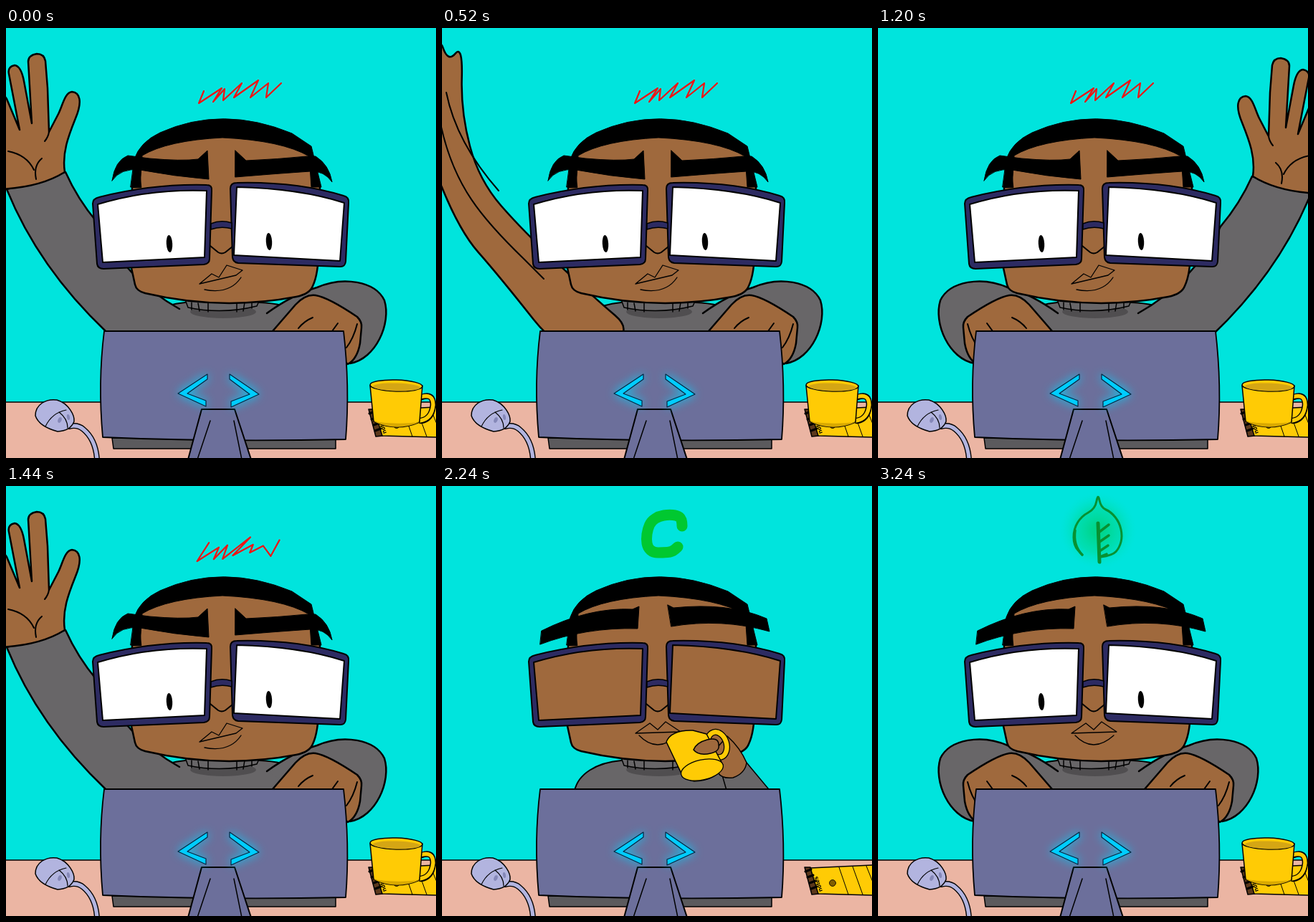
Write an HTML page with a canvas that moves like this. It is 600 px wide and 600 px high and loops after 3280 ms.

```html
<!DOCTYPE html>
<html lang="en">
<head>
<meta charset="utf-8">
<title>Desk worker</title>
<style>
html, body { margin: 0; width: 100%; height: 100%; overflow: hidden; background: #00e4dd; }
canvas { display: block; width: 600px; height: 600px; }
</style>
</head>
<body>
<canvas id="stage" width="600" height="600"></canvas>
<script>
const c = document.getElementById('stage').getContext('2d');
const LOOP = 3280, STEP = 40;
const SKIN = '#9f693d', GREY = '#686668', YELLOW = '#ffcb05', NAVY = '#2d2b62', LILAC = '#b2b4df';
const clamp = x => Math.max(0, Math.min(1, x));
const ramp = (t, a, b) => clamp((t - a) / (b - a));
const ease = x => x * x * (3 - 2 * x);
const mix = (a, b, k) => a + (b - a) * k;
const mixPoints = (a, b, k) => a.map((p, i) => [mix(p[0], b[i][0], k), mix(p[1], b[i][1], k)]);
const mixColor = (a, b, k) => `rgb(${a.map((v, i) => Math.round(mix(v, b[i], k)))})`;
const middle = (a, b) => [(a[0] + b[0]) / 2, (a[1] + b[1]) / 2];

function shape(d, fill, width = 2, stroke = '#000') {
  const p = new Path2D(d);
  if (fill) { c.fillStyle = fill; c.fill(p); }
  if (width) { c.lineWidth = width; c.strokeStyle = stroke; c.stroke(p); }
}
function oval(x, y, rx, ry, turn, fill, width = 0) {
  c.beginPath();
  c.ellipse(x, y, rx, ry, turn, 0, 7);
  c.fillStyle = fill;
  c.fill();
  if (width) { c.lineWidth = width; c.strokeStyle = '#000'; c.stroke(); }
}
function at(x, y, draw, flip = 1) {
  c.save();
  c.translate(x, y);
  c.scale(flip, 1);
  draw();
  c.restore();
}
// Soft curves running through the midpoints, closed and open
function softLoop(pts) {
  const mid = i => middle(pts[i % pts.length], pts[(i + 1) % pts.length]);
  return `M${mid(0)}` + pts.map((p, i) => `Q${pts[(i + 1) % pts.length]} ${mid(i + 1)}`).join('');
}
function softLine(pts) {
  const inner = pts.slice(1, -1).map((p, i) => `Q${p} ${middle(p, pts[i + 2])}`);
  return `M${pts[0]}${inner.join('')}L${pts[pts.length - 1]}`;
}

// Arms are drawn for the right side of the stage and mirrored for the left
const SWING = [[350,426],[402,380],[480,306],[530,252],[554,182],[557,114],[578,136],[590,108],[612,205],[568,325],[520,378],[440,460]];
const TYPE = [[372,423],[395,395],[415,374],[430,370],[450,376],[470,386],[492,400],[498,412],[496,435],[490,462],[477,471],[440,440]];

function sleeve() {
  shape('M364 398 Q400 372 434 362 C470 346 515 353 528 380 C538 412 516 462 480 468', GREY, 2.5);
}
function restArm() {
  sleeve();
  shape('M372 423 L404 386 Q418 371 432 373 Q450 376 490 403 Q497 410 496 418 L494 440 Q490 462 477 469 L440 440', SKIN, 2.5);
  shape('M428 404 Q416 409 408 419 M463 412 L455 423 M490 413 Q485 433 475 446', null);
}
function raisedArm() {
  shape('M363 398 Q440 355 478 277 Q505 245 522 207 L604 231 Q560 340 465 430 L363 445', GREY, 2.5);
  shape('M523 207 C527 180 518 157 508 132 C498 108 502 96 513 95 C523 96 526 114 532 126 L545 151 L547 90 L550 52 Q552 42 562 42 Q574 44 574 53 L569 139 L580 80 Q584 59 593 58 Q603 60 601 70 L586 148 L604 105 Q612 92 618 105 L620 231 Q560 230 523 207Z', SKIN, 2.5);
  shape('M545 151 Q546 158 551 164 M555 188 Q567 198 563 217 M602 178 Q576 183 566 204', null);
}
function swingingArm(k) {
  if (k > .55) sleeve();
  shape(softLoop(mixPoints(SWING, TYPE, k)), SKIN, 2.5);
  if (k < .5) {
    c.globalAlpha = 1 - 2 * Math.max(0, k);
    at(-90 * k, 180 * k, () =>
      shape('M579 150 Q565 220 506 287 M586 198 C568 280 530 325 471 382 L443 410', null));
    c.globalAlpha = 1;
  }
}
// Phase runs 0..480, fully raised at 0
function arm(phase, left) {
  const k = phase < 240 ? (phase - 80) / 120 : (440 - phase) / 80;
  const up = phase < 40, flip = left ? -1 : 1;
  const draw = up ? raisedArm : k >= 1 ? restArm : () => swingingArm(k);
  at(left ? (up ? 605 : 615) : 0, left && up ? -6 : 0, draw, flip);
}

function torso() {
  shape('M185 425 C190 402 215 386 250 383 H354 C400 385 430 402 435 425', GREY, 2);
}
function collar() {
  oval(303, 396, 46, 9, 0, '#504e50');
  shape('M250 379 L254 390 Q302 400 350 388 L354 379', GREY, 1.5);
  shape('M259 383 V393 M268 384 L270 395 M282 384 V396 M322 384 V396 M333 383 L331 395 M343 382 V391', null, 1.5);
}

function head(angry, asleep) {
  shape('M184 178 L188 222 H176 L175 335 L180 358 Q182 367 194 370 Q300 395 405 375 Q424 371 428 360 Q436 343 436 310 L438 222 L424 178 Q305 115 184 178Z', SKIN, 2.5);
  shape('M179 183 Q187 159 215 146 Q302 107 399 147 L426 165 L440 222 H426 L423 179 Q385 157 302 153 Q225 157 190 178 L187 222 H174Z', '#000', 1);
  if (angry) {
    shape('M148 213 Q152 185 170 178 L200 182 Q245 186 268 183 L281 171 L283 211 Q235 207 187 198 Q160 195 148 213Z M320 171 L335 185 Q380 183 420 179 L432 179 Q451 191 455 215 Q444 199 425 200 Q380 203 320 208Z', '#000', 1);
  } else {
    shape('M139 202 Q205 169 266 172 L275 168 L273 199 Q200 197 137 221Z M315 166 L323 170 Q400 162 453 185 L457 203 Q390 184 320 196Z', '#000', 1);
  }
  shape('M285 304 L296 313 Q301 316 306 313 L316 305', null);
  shape('M121 245 Q121 238 130 236 Q205 217 280 219 Q288 219 287 227 L284 322 Q284 329 276 330 L136 336 Q128 336 127 329Z', NAVY);
  shape('M313 224 Q313 216 322 216 Q405 214 471 234 Q479 236 478 244 L474 326 Q473 334 465 333 L324 328 Q317 327 316 320Z', NAVY);
  shape('M286 273 Q300 267 315 272 L315 280 Q300 276 286 281Z', NAVY, 1.5);
  const lens = asleep ? SKIN : '#fff';
  shape('M128 246 Q200 224 280 227 L277 320 L135 327Z', lens);
  shape('M322 222 Q410 224 472 244 L466 325 L318 317Z', lens);
  if (!asleep) {
    oval(228, 301, 4.2, 12, -.06, '#000');
    oval(367, 298, 4.2, 12, -.06, '#000');
  }
  shape(angry
    ? 'M270 357 L287 343 L297 348 L308 331 L330 338 L321 345Z M277 365 Q312 372 328 348'
    : 'M270 345 L290 331 L301 340 L312 329 L333 343Z M275 348 Q300 374 329 348', null, 1.3);
}

function monitor() {
  shape('M148 572 H460 V587 H150Z', '#5b5a5d', 1.5);
  shape('M137 423 H471 Q480 500 474 574 Q300 578 135 571 Q128 495 137 423Z', '#6c6f9b', 1.8);
  shape('M273 532 H319 L342 602 H254Z', '#6c6f9b');
  shape('M285 548 L267 602 M318 548 L329 602', null, 1.5);
  c.shadowColor = '#00d5ff';
  c.shadowBlur = 14;
  const marks = 'M281 483 L240 510 L279 528 V520 L253 510 L281 490Z M312 483 L353 511 L314 529 V521 L340 511 L312 490Z';
  shape(marks, '#00cdff', 0);
  c.shadowBlur = 0;
  shape(marks, '#00cdff', 1.2, '#04243f');
}
function desk() {
  shape('M-2 522 H602 V602 H-2Z', '#ebb5a3', 1.5);
  // Mouse
  const cable = 'M88 556 Q100 553 108 560 Q125 574 127 602';
  shape(cable, null, 8);
  shape(cable, null, 5.2, LILAC);
  shape('M41 541 C41 525 56 517 71 519 C88 524 96 541 95 549 Q90 562 72 563 Q46 556 41 541Z', LILAC, 1.5);
  shape('M55 556 Q64 537 84 533 M74 536 Q86 545 86 558', null, 1.2);
  oval(75, 547, 2.5, 4, .4, '#8588b8');
  oval(87, 543, 2, 4, -.2, '#8588b8');
  // Notepad
  shape('M506 532 L514 532 L526 569 L516 570Z', '#5b381c', 1.5);
  shape('M514 533 L602 529 V571 L525 569Z', YELLOW, 1.5);
  shape('M507 538 L515 535 M510 546 L518 543 M513 554 L521 551 M515 562 L523 559', null, 3);
  shape('M554 532 L567 570 M573 531 L587 570 M592 530 L602 555', null, 1);
  oval(545, 554, 4.5, 4.5, 0, '#805f00', .8);
  at(531, 565, () => {
    c.rotate(-1.9);
    c.fillStyle = '#000';
    c.font = 'bold 8px Inter, sans-serif';
    c.fillText('notes', 0, 0);
  });
}
function mug() {
  shape('M580 515 Q596 509 596 526 Q594 546 579 548', null, 8.5);
  shape('M578 515 Q596 509 596 526 Q594 546 577 548', null, 5.5, YELLOW);
  shape('M508 499 L513 549 Q545 564 577 550 L581 499', YELLOW, 1.5);
  shape('M513 549 Q545 564 577 550 Q545 554 513 549', '#d9a900', 0);
  oval(544.5, 499, 36.5, 8, .03, YELLOW, 1.5);
  oval(545, 501, 33, 5.5, .03, '#d5a614');
}
function reachingHand() {
  shape('M465 496 Q510 498 532 506 L549 506 Q560 510 551 514 Q561 518 552 523 Q546 528 531 528 L538 539 Q543 549 535 550 L527 544 L523 550 Q500 556 465 553', SKIN);
  shape('M551 514 L536 516 M552 523 L538 522 M531 528 Q524 533 527 544', null, 1.5);
}
function sip() {
  shape('M425 386 L460 428 H398 L390 400Z', GREY, 1.5);
  shape('M385 400 Q391 409 406 407 Q423 401 425 386 Q416 365 398 349 L378 372Z', SKIN, 1.5);
  c.beginPath();
  c.ellipse(384, 361, 13, 18, -.3, 0, 7);
  c.lineWidth = 9;
  c.strokeStyle = '#000';
  c.stroke();
  c.lineWidth = 6.5;
  c.strokeStyle = YELLOW;
  c.stroke();
  shape('M313 357 Q320 340 350 341 L369 346 L392 389 Q386 410 352 412 Q338 410 333 399Z', YELLOW, 1.5);
  oval(363, 396, 30, 14, -.22, YELLOW, 1.3);
  shape('M351 368 Q355 358 370 354 Q386 350 386 361 Q388 370 375 373 Q358 377 351 368Z', SKIN, 1.5);
}

const SCRAWL = [[276,88],[269,105],[301,84],[289,103],[305,85],[303,101],[329,77],[318,97],[352,73],[341,97],[366,77],[363,97],[384,77]];
const JITTER = [[285,77],[266,105],[296,86],[290,102],[310,82],[302,102],[344,70],[316,97],[343,84],[340,92],[357,85],[371,98],[381,75]];
const HOOK = [[335,56],[335,46],[328,41],[316,40],[303,42],[292,49],[287,60],[285,74],[287,86],[295,93],[308,93],[321,92],[329,85]];
const LEAF = [[311,99],[327,97],[337,86],[341,70],[337,51],[325,36],[311,30],[307,10],[303,32],[284,42],[273,60],[273,83],[285,96]];
const RED = [239, 20, 20], GREEN = [0, 200, 48], DARK = [8, 145, 50];

function mood(t) {
  const toHook = ease(ramp(t, 1800, 2200)), toLeaf = ease(ramp(t, 2280, 2600));
  const wobble = clamp(1 - Math.abs(t % 400 - 260) / 100) * (1 - toHook);
  const scrawl = mixPoints(SCRAWL, JITTER, wobble);
  const pts = mixPoints(mixPoints(scrawl, HOOK, toHook), LEAF, toLeaf);
  const glow = ramp(t, 2480, 2720);
  if (glow) {
    const g = c.createRadialGradient(307, 62, 8, 307, 62, 54);
    g.addColorStop(0, `rgba(0,205,100,${.65 * glow})`);
    g.addColorStop(.5, `rgba(0,215,130,${.45 * glow})`);
    g.addColorStop(1, 'rgba(0,229,200,0)');
    c.fillStyle = g;
    c.fillRect(250, 5, 115, 115);
  }
  const color = toLeaf ? mixColor(GREEN, DARK, toLeaf) : mixColor(RED, GREEN, toHook);
  const line = toHook > .5 ? softLine(pts) : 'M' + pts.join('L');
  shape(line, null, toLeaf ? mix(15, 3, toLeaf) : mix(2.2, 15, toHook), color);
  if (toLeaf > .7) {
    c.globalAlpha = (toLeaf - .7) / .3;
    shape('M307 52 L309 106', null, 5, color);
    shape('M309 64 L322 54 M309 78 L322 69 M309 91 L321 83 M309 99 L319 95 M275 62 Q272 83 285 96', null, 3.5, color);
    c.globalAlpha = 1;
  }
}

function arms(t) {
  if (t < 1720) {
    arm(t % 480, true);
    arm((t + 240) % 480, false);
  } else if (t >= 3040) {
    const drop = 110 * (1 - ease(ramp(t, 3040, 3160)));
    at(615, drop, restArm, -1);
    at(0, drop, restArm);
  }
}

function draw(t) {
  const angry = t < 1720;
  c.fillStyle = '#00e4dd';
  c.fillRect(0, 0, 600, 600);
  c.lineCap = c.lineJoin = 'round';
  mood(t);
  desk();
  if (t < 1760 || t >= 2960) mug();
  torso();
  arms(t);
  collar();
  head(angry, t >= 2160 && t < 2840);
  if (t >= 1920 && t < 2960) {
    const raised = ease(ramp(t, 1900, 2080)) * (1 - ease(ramp(t, 2820, 2960)));
    at(25 * (1 - raised), 100 * (1 - raised), sip);
  }
  if (t >= 1720 && t < 1880) at(-90 * ramp(t, 1760, 1880), 0, reachingHand);
  if (t >= 2920 && t < 3040) at(-90 * Math.abs(t - 2960) / 80, 0, reachingHand);
  monitor();
}

const start = performance.now();
function tick() {
  const t = (performance.now() - start) % LOOP;
  draw(Math.floor(t / STEP) * STEP);
  requestAnimationFrame(tick);
}
tick();
</script>
</body>
</html>
```
